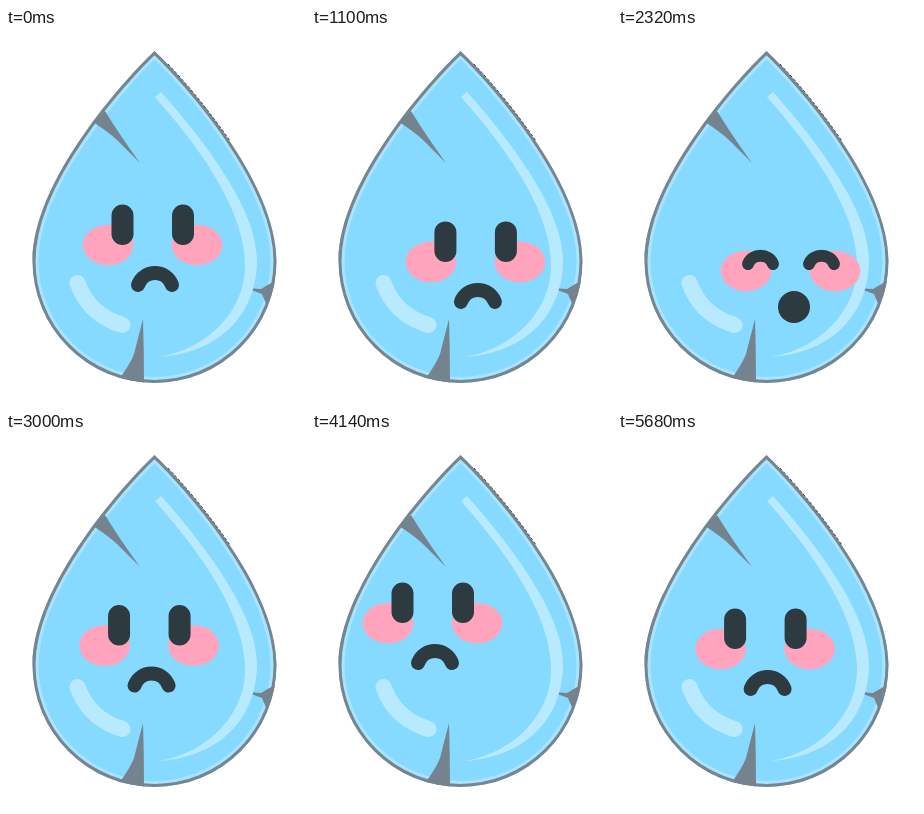
An HTML page that plays this animation: 300x376 px, repeating every 5.72 s.

```html
<!DOCTYPE html>
<html lang="en">
<head>
<meta charset="utf-8">
<title>Sad water drop</title>
<style>
  html, body { margin: 0; width: 100%; height: 100%; overflow: hidden; background: #fff; }
  svg { display: block; width: 100vw; height: 100vh; }
  .line { fill: none; stroke: #2d3a40; stroke-linecap: round; }
</style>
</head>
<body>
<svg viewBox="0 0 300 376">
  <defs>
    <path id="drop" d="M148.5 23C118 52 26.5 153 26.5 233A122 122 0 0 0 270.5 233C270.5 153 179 52 148.5 23Z"/>
    <clipPath id="inside"><use href="#drop"/></clipPath>
  </defs>

  <g clip-path="url(#inside)">
    <use href="#drop" fill="#87daff"/>
    <use href="#drop" fill="none" stroke="#a9e4ff" stroke-width="12"/>
    <use href="#drop" fill="none" stroke="#77858f" stroke-width="6"/>
    <g fill="#74838e">
      <path d="M87 94L99 83Q113 106 134 135L112 113Q104 105 87 94Z"/>
      <path d="M240 260L255 261L272 251L261 278L256 266Z"/>
      <path d="M137 291Q138 322 138 356L114 350Q128 330 129 322Z"/>
    </g>
  </g>
  <path d="M162 36Q195 71 224 113" fill="none" stroke="#3c4246" stroke-width="1" stroke-dasharray="3 2"/>

  <g fill="#b7e9ff">
    <path d="M155 64C205 120 251 185 251 232C251 285 215 325 153 329C205 320 239 280 239 238C239 188 203 130 149 69Z"/>
    <path d="M71.5 255Q83 287 116.5 297" fill="none" stroke="#b7e9ff" stroke-width="16" stroke-linecap="round"/>
  </g>

  <g id="face">
    <g fill="#ffa4bc">
      <ellipse cx="102" cy="217" rx="25.3" ry="20.3"/>
      <ellipse cx="191" cy="217" rx="25.3" ry="20.3"/>
    </g>
    <g id="sad" class="line">
      <path d="M116.5 187.5V206M177 187.5V206" stroke-width="22"/>
      <path d="M132 257C138 241 160 241 166 257" stroke-width="14"/>
    </g>
    <g id="happy" class="line">
      <path d="M104 210C108 199 125 199 129 210M165 210C169 199 186 199 190 210" stroke-width="12"/>
      <circle cx="150" cy="253" r="16" fill="#2d3a40" stroke="none"/>
    </g>
  </g>
</svg>
<script>
const LOOP = 5720;
const el = id => document.getElementById(id);

// Eased progress from 0 to 1 between two times
const ease = (t, from, to) => {
  const u = Math.min(1, Math.max(0, (t - from) / (to - from)));
  return u * u * (3 - 2 * u);
};

function draw(now) {
  const t = now % LOOP;
  const diagonal = 26 * ease(t, 620, 1420) - 52 * ease(t, 2620, 3320);
  const x = diagonal + 26.6 * ease(t, 4740, 5440);
  const y = diagonal + 26 * ease(t, 4130, 4740);
  const joy = ease(t, 1800, 2100) - ease(t, 2400, 2600);
  el('face').setAttribute('transform', `translate(${x} ${y})`);
  el('sad').setAttribute('opacity', 1 - joy);
  el('happy').setAttribute('opacity', joy);
}

const start = performance.now();
(function tick() {
  draw(performance.now() - start);
  requestAnimationFrame(tick);
})();
</script>
</body>
</html>
```
